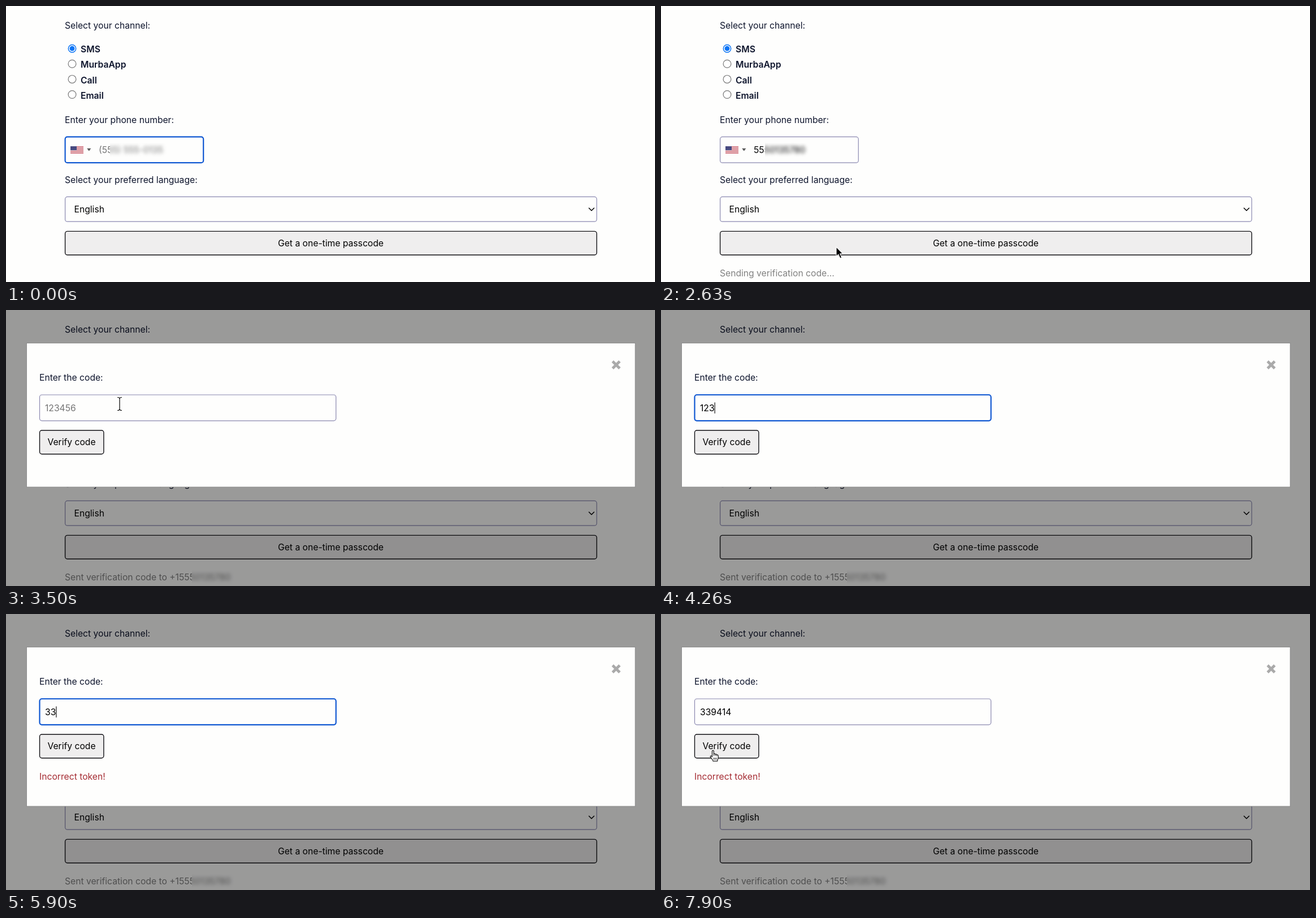
Animation, 1148 px wide and 488 px high, one loop 8 s. Source, as an HTML page:

```html
<!DOCTYPE html>
<html lang="en">
<head>
<meta charset="utf-8">
<title>One-time passcode</title>
<style>
  html, body { margin: 0; width: 100%; height: 100%; overflow: hidden; background: #fefefd; }
  svg { display: block; width: 100%; height: 100%; }
  text {
    font: 400 15.68px Inter, Arial, sans-serif;
    font-optical-sizing: none;
    fill: #0d142c;
    white-space: pre;
  }
  .bold { font-weight: 600; }
  .black { fill: #000; }
  .status { fill: #808080; }
  .hint { fill: #757575; }
  .error { fill: #a52c33; }
  .field { fill: #fefefd; stroke: #8a88b0; stroke-width: 1.2; }
  .field.focus { stroke: #1058d2; stroke-width: 2.2; }
  .button { fill: #efeeee; stroke: #101014; stroke-width: 1.4; }
  .radio { fill: #fff; stroke: #767676; stroke-width: 1.2; }
  .line { fill: none; stroke: #000; stroke-linecap: round; stroke-linejoin: round; }
</style>
</head>
<body>
<svg viewBox="0 0 1148 488">
  <defs>
    <filter id="blur" x="-10%" y="-80%" width="120%" height="260%"><feGaussianBlur stdDeviation="3.3"/></filter>
    <clipPath id="phoneClear"><rect x="150" y="240" width="34" height="30"/></clipPath>
    <clipPath id="phoneHidden"><rect x="184" y="242" width="120" height="25"/></clipPath>
    <clipPath id="sentClear"><rect x="100" y="460" width="229" height="28"/></clipPath>
    <clipPath id="sentHidden"><rect x="329" y="460" width="90" height="28"/></clipPath>
    <g id="phone"><text id="phoneText" x="164" y="259.6"/><rect id="phoneCaret" y="244.5" width="1.1" height="19.5"/></g>
    <text id="sent" class="status" x="104" y="477.8">Sent verification code to +15550135780</text>
  </defs>

  <text x="104" y="39.5">Select your channel:</text>
  <g id="channels"></g>
  <text x="104" y="206.7">Enter your phone number:</text>
  <rect id="phoneField" x="104.6" y="231.4" width="244.6" height="45.8" rx="4"/>
  <rect x="114" y="248" width="23" height="13" fill="#f4eeee"/>
  <path d="M125.5 248v13" stroke="#c9505f" stroke-width="23" stroke-dasharray="1"/>
  <rect x="114" y="248" width="11" height="7" fill="#484a80"/>
  <path d="M143.2 251.8h7.2l-3.6 4.6z" fill="#555"/>
  <g clip-path="url(#phoneClear)"><use href="#phone"/></g>
  <g clip-path="url(#phoneHidden)"><use href="#phone" filter="url(#blur)"/></g>

  <text x="104" y="313">Select your preferred language:</text>
  <rect class="field" x="104.6" y="337.4" width="940.3" height="43.8" rx="4"/>
  <text class="black" x="120.5" y="365">English</text>
  <path class="line" d="M1031.2 357.2l4.5 4.5 4.5-4.5" stroke-width="1.5"/>
  <rect class="button" x="104.6" y="398.4" width="940.3" height="41.8" rx="4"/>
  <text class="black" x="574.5" y="425" text-anchor="middle">Get a one-time passcode</text>
  <text id="sending" class="status" x="104" y="477.8">Sending verification code...</text>

  <g id="modal">
    <g clip-path="url(#sentClear)"><use href="#sent"/></g>
    <g clip-path="url(#sentHidden)"><use href="#sent" filter="url(#blur)"/></g>
    <rect width="1148" height="488" opacity=".395"/>
    <rect id="panel" x="36.5" y="58.5" width="1076.5" fill="#fefefd" stroke="#888" stroke-width=".9"/>
    <path d="M1073 90.8l12.6 12.4m0-12.4l-12.6 12.4" stroke="#aaa" stroke-width="4.8"/>
    <text x="59" y="125.4">Enter the code:</text>
    <rect id="codeField" x="59.5" y="150" width="524.2" height="45.8" rx="4"/>
    <text id="codeText" x="69" y="178.6"/>
    <rect id="codeCaret" y="163.4" width="1.1" height="19.5"/>
    <rect class="button" x="59.5" y="212.8" width="113.4" height="42" rx="4"/>
    <text class="black" x="116" y="239.4" text-anchor="middle">Verify code</text>
    <text id="message" x="59" y="292.6"/>
  </g>

  <g id="pointer">
    <path id="arrow" d="M0 0V16.6l3.8-3.5 3 7 2.9-1.2-3-6.8h5.1z" stroke="#fff" stroke-width="1.1"/>
    <g id="beam" class="line">
      <path id="beamShape" d="M-3.5-11.5Q0-11.5 0-9V9Q0 11.5-3.5 11.5M3.5-11.5Q0-11.5 0-9V9Q0 11.5 3.5 11.5" stroke-width="1.2"/>
    </g>
    <g id="hand" transform="translate(-5.5 -1)" stroke="#222" stroke-width="1.3" stroke-linejoin="round">
      <path fill="#fff" d="M5.3 1.2c1.2 0 1.6.9 1.6 2v4.2c1-.7 2.4-.4 2.7.7 1-.5 2.3-.1 2.6.9 1.3-.4 2.6.3 2.6 2v2.8c0 2.6-1.6 3.4-1.6 6.4H5.6c0-2.4-2.6-4.2-4.6-7.4-.9-1.5.9-2.7 2.2-1.2l.8 1V3.2c0-1.1.2-2 1.3-2z"/>
      <path fill="none" stroke-width="1" d="M6.9 7.4v3.4M9.6 8.1v3M12.2 9v2.4M7 14v3.6M9.3 14v3.6M11.5 14v3.6"/>
    </g>
  </g>
</svg>

<script>
const DURATION = 8000;
const $ = id => document.getElementById(id);
const show = (id, visible) => $(id).setAttribute('display', visible ? 'inline' : 'none');
const setClass = (id, name) => $(id).setAttribute('class', name);
const prefixes = (word, from, times) => times.map((time, i) => [time, word.slice(0, from + i)]);

// Each table holds [start time, value]; a value stays until the next one.
const PHONE = [[0, ''], ...prefixes('5550135780', 1,
  [100, 180, 260, 400, 1230, 1460, 1560, 1660, 1760, 1860])];
const PHONE_CARET = [[0, false], [100, true], [700, false], [960, true], [2160, false]];
const CODE = [[0, ''],
  ...prefixes('123456', 1, [4130, 4200, 4260, 4400, 4460, 4530]),
  [5230, ''],
  ...prefixes('339414', 1, [5830, 5900, 6160, 7030, 7130, 7230])];
const CODE_FOCUS = [[0, false], [3530, true], [4990, false], [5760, true], [7860, false]];
const CODE_CARET = [[0, true], [3860, false], [4130, true], [4830, false],
  [5760, true], [6460, false], [6730, true], [7530, false], [7800, true]];
const MESSAGE = [[0, '', ''], [5130, 'Checking code 123456...', 'status'], [5230, 'Incorrect token!', 'error']];
const POINTER_SHOWN = [[0, false], [2100, true], [4130, false], [4620, true], [5830, false], [7530, true]];

// [start, end, from, to]
const MOVES = [
  [2100, 2400, [262, 257], [310, 426]],
  [3100, 3500, [310, 426], [201, 166]],
  [4620, 4950, [201, 166], [116.5, 246]],
  [5530, 5740, [116.5, 246], [110, 173]],
  [7530, 7760, [110, 173], [92, 258]],
  [7760, 7890, [92, 258], [92, 241]],
];

const row = (table, t) => table.findLast(([start]) => start <= t);
const at = (table, t) => row(table, t)[1];
const ease = p => p * p * (3 - 2 * p);

function pointerAt(t) {
  const [start, end, from, to] = row(MOVES, t) || MOVES[0];
  const stepped = start + Math.floor((t - start) / 40) * 40;
  const p = t >= end ? 1 : ease(Math.max(0, stepped - start) / (end - start));
  return from.map((v, i) => v + (to[i] - v) * p);
}

function pointerShape(x, y, modal) {
  const inside = (l, top, r, b) => x > l && x < r && y > top && y < b;
  if (modal && inside(59, 212, 173, 255)) return 'hand';
  const overField = modal ? inside(59, 149, 584, 196) : inside(104, 231, 350, 278);
  return overField ? 'beam' : 'arrow';
}

function drawField(name, value, hint, focused, caretOn) {
  const text = $(name + 'Text');
  text.textContent = value || hint;
  text.setAttribute('class', value ? 'black' : 'hint');
  setClass(name + 'Field', focused ? 'field focus' : 'field');
  show(name + 'Caret', focused && caretOn);
  const width = value ? $(name + 'Measure').getComputedTextLength() : 0;
  $(name + 'Caret').setAttribute('x', +text.getAttribute('x') + width);
}

function draw(t) {
  const modal = t >= 2700;
  drawField('phone', at(PHONE, t), '(555) 555-0135', t < 2400, at(PHONE_CARET, t));
  show('sending', t >= 2460 && !modal);
  show('modal', modal);

  if (modal) {
    drawField('code', at(CODE, t), '123456', at(CODE_FOCUS, t), at(CODE_CARET, t));
    const [, message, tone] = row(MESSAGE, t);
    $('message').textContent = message;
    setClass('message', tone);
    $('panel').setAttribute('height', message ? 281.5 : 254.5);
  }

  const [x, y] = pointerAt(t);
  const shape = pointerShape(x, y, modal);
  show('pointer', at(POINTER_SHOWN, t));
  $('pointer').setAttribute('transform', `translate(${x} ${y})`);
  for (const id of ['arrow', 'beam', 'hand']) show(id, id === shape);
}

function buildChannels() {
  $('channels').innerHTML = ['SMS', 'MurbaApp', 'Call', 'Email'].map((label, i) => {
    const y = 75.2 + i * 27.1;
    const radio = i
      ? `<circle class="radio" cx="117" cy="${y}" r="6.9"/>`
      : `<circle cx="117" cy="${y}" r="6.7" fill="#fff" stroke="#0b74f5" stroke-width="1.5"/>
         <circle cx="117" cy="${y}" r="4.4" fill="#0b74f5"/>`;
    return `${radio}<text class="bold" x="132" y="${y + 7.1}">${label}</text>`;
  }).join('');
}

// Invisible twins give the caret position even while a field is only referenced.
function buildMeasures() {
  for (const name of ['phone', 'code']) {
    const twin = document.createElementNS('http://www.w3.org/2000/svg', 'text');
    twin.id = name + 'Measure';
    twin.setAttribute('visibility', 'hidden');
    document.querySelector('svg').append(twin);
  }
}

function frame() {
  const t = (performance.now() - begin) % DURATION;
  $('phoneMeasure').textContent = at(PHONE, t);
  $('codeMeasure').textContent = at(CODE, t);
  draw(t);
  requestAnimationFrame(frame);
}

buildChannels();
buildMeasures();
const begin = performance.now();
frame();
</script>
</body>
</html>
```
